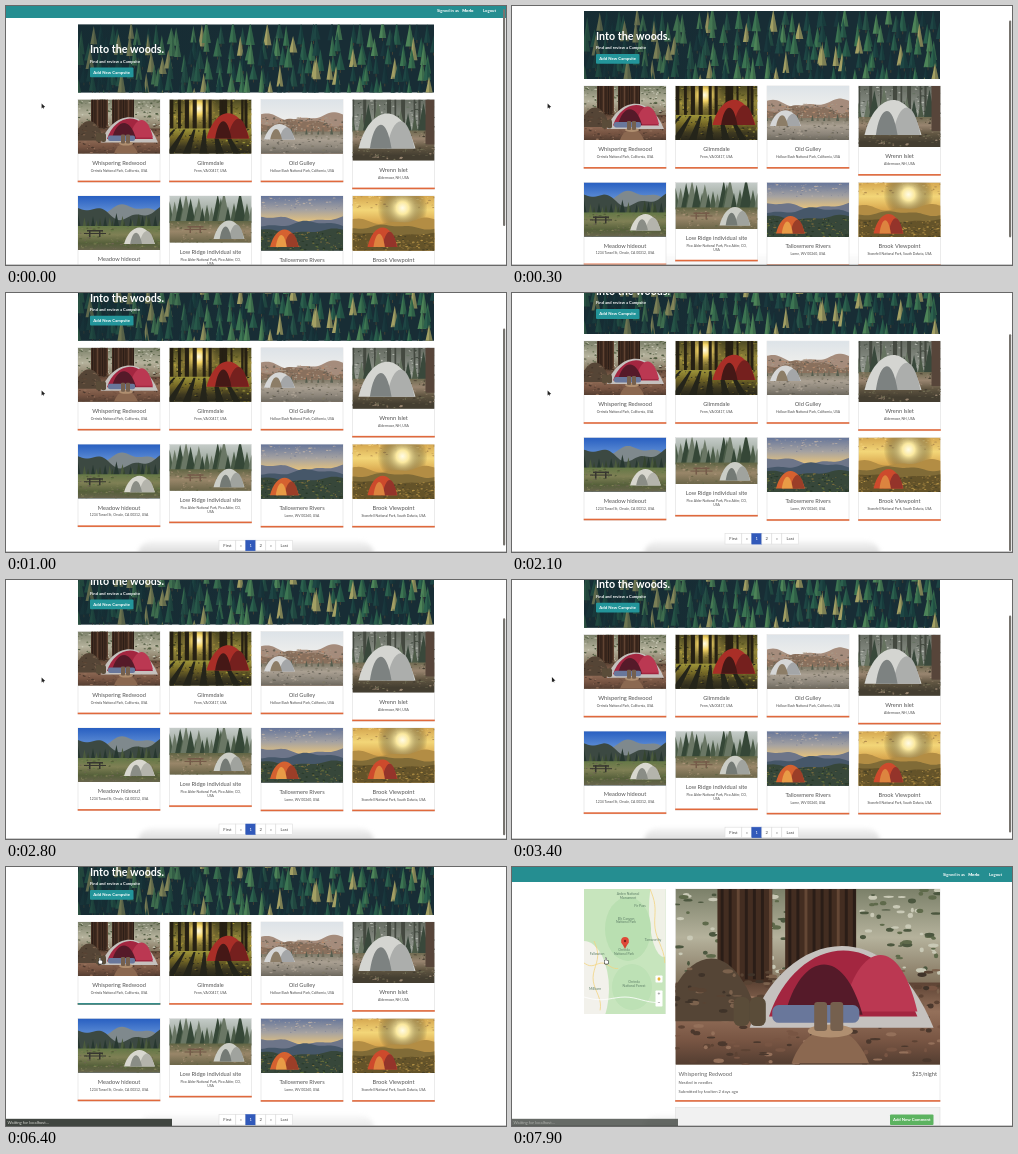
These frames come from a looping animation (500 by 259 pixels, 8 s). An HTML page with a canvas:

```html
<!DOCTYPE html>
<html lang="en">
<head>
<meta charset="utf-8">
<title>Campsites</title>
<style>
html, body { margin: 0; width: 100%; height: 100%; overflow: hidden; background: #fff; }
canvas { display: block; width: 500px; height: 259px; }
</style>
</head>
<body>
<canvas id="stage"></canvas>
<script>
const W = 500, H = 259, LOOP = 8000, STEP = 100;
const FONT = 'Lato, "Open Sans", sans-serif';
const TEAL = '#258e91', ORANGE = '#e0693c';
const canvas = document.getElementById('stage');
const dpr = window.devicePixelRatio || 1;
canvas.width = W * dpr;
canvas.height = H * dpr;
const c = canvas.getContext('2d');

function rect(x, y, w, h, fill) {
  c.fillStyle = fill;
  c.fillRect(x, y, w, h);
}

function poly(fill, ...p) {
  c.fillStyle = fill;
  c.beginPath();
  for (let i = 0; i < p.length; i += 2) c.lineTo(p[i], p[i + 1]);
  c.fill();
}

function oval(x, y, rx, ry, fill) {
  c.fillStyle = fill;
  c.beginPath();
  c.ellipse(x, y, rx, ry, 0, 0, 7);
  c.fill();
}

function pill(x, y, w, h, r, fill) {
  c.fillStyle = fill;
  c.beginPath();
  c.roundRect(x, y, w, h, r);
  c.fill();
}

function outline(x, y, w, h, color) {
  c.strokeStyle = color;
  c.lineWidth = 0.6;
  c.strokeRect(x, y, w, h);
}

function text(s, x, y, size, fill, align = 'left', weight = 400) {
  c.font = `${weight} ${size}px ${FONT}`;
  c.textAlign = align;
  c.textBaseline = 'middle';
  c.fillStyle = fill;
  c.fillText(s, x, y);
}

function clipped(x, y, w, h, paint) {
  c.save();
  c.beginPath();
  c.rect(x, y, w, h);
  c.clip();
  paint();
  c.restore();
}

function fade(y0, y1, ...colors) {
  const g = c.createLinearGradient(0, y0, 0, y1);
  colors.forEach((col, i) => g.addColorStop(i / (colors.length - 1), col));
  return g;
}

function rng(seed) {
  return () => (seed = (seed * 16807) % 2147483647) / 2147483647;
}

// Eased progress from 0 at a to 1 at b
function smooth(t, a, b) {
  const p = Math.min(1, Math.max(0, (t - a) / (b - a)));
  return p * p * (3 - 2 * p);
}

// Scenery, in units where a picture is 82 wide

function glare(x, y, r, color) {
  const g = c.createRadialGradient(x, y, 0, x, y, r);
  g.addColorStop(0, '#fffbe6');
  g.addColorStop(0.25, color);
  g.addColorStop(1, 'transparent');
  rect(0, 0, 82, 61, g);
}

function ridge(y, amp, seed, fill) {
  c.fillStyle = fill;
  c.beginPath();
  c.moveTo(0, 62);
  for (let x = 0; x <= 82; x += 2) {
    c.lineTo(x, y - amp * (Math.sin(x / 13 + seed) * 0.6 + Math.sin(x / 5 + seed * 3) * 0.3));
  }
  c.lineTo(82, 62);
  c.fill();
}

function trunks(seed, n, base, w, color) {
  const r = rng(seed);
  for (let i = 0; i < n; i++) rect((i + r() * 0.8) * 82 / n, 0, w * (0.5 + r()), base + r() * 2, color);
}

function pines(seed, n, base, size, ...colors) {
  const r = rng(seed);
  for (let i = 0; i < n; i++) {
    const x = (i + r()) * 82 / n, h = size * (0.6 + r() * 0.7), w = h * 0.2;
    poly(colors[i % colors.length], x - w, base, x, base - h, x + w, base);
  }
}

function specks(seed, n, y0, y1, ...colors) {
  const r = rng(seed);
  for (let i = 0; i < n; i++) {
    oval(r() * 82, y0 + r() * (y1 - y0), 0.4 + r() * 1.3, 0.2 + r() * 0.6, colors[i % colors.length]);
  }
}

function ground(seed, y, ...colors) {
  rect(0, y, 82, 62 - y, fade(y, 56, ...colors));
  specks(seed, 170, y, 60, ...colors);
}

function dome(x, y, w, h, fill) {
  c.fillStyle = fill;
  c.beginPath();
  c.moveTo(x, y + h);
  c.bezierCurveTo(x + w * 0.16, y - h * 0.08, x + w * 0.72, y - h * 0.5, x + w, y + h);
  c.fill();
}

function tent(x, y, w, h, light, shade, door) {
  dome(x, y, w, h, light);
  dome(x + w * 0.5, y + h * 0.22, w * 0.48, h * 0.78, shade);
  dome(x + w * 0.2, y + h * 0.32, w * 0.38, h * 0.68, door);
}

function table(x, y, color) {
  rect(x + 3, y, 16, 1.5, color);
  rect(x, y + 3, 22, 1, color);
  for (const dx of [5, 15]) rect(x + dx, y, 1.5, 7, color);
}

const scenes = [
  () => {
    rect(0, 0, 82, 55, fade(0, 30, '#7b8069', '#b5b29c', '#80705a'));
    specks(9, 200, 0, 26, '#4c573f', '#c9c9b6', '#5f6a4b');
    ground(5, 29, '#5d4334', '#94705a', '#785543', '#4b382d');
    for (const [x, w] of [[13, 17], [34, 22]]) {
      rect(x, 0, w, 29, '#432d21');
      for (let i = 1; i < w; i += 2.5) rect(x + i, 0, 0.9, 28, i % 2 ? '#2a1d17' : '#644735');
    }
    dome(-4, 21, 30, 20, '#554536');
    specks(13, 90, 24, 38, '#3f3329', '#7c624d', '#584333');
    dome(23, 17, 57, 26, '#c5c1be');
    dome(29, 18.5, 46, 21, '#a32640');
    dome(52, 20, 23, 18, '#bb3852');
    dome(34, 23, 24, 16, '#551a29');
    pill(30, 36, 27, 5.5, 2, '#69779b');
    for (const x of [18, 23]) pill(x, 33.5, 5, 9, 2, '#5a4c39');
    dome(36, 43, 24, 11, '#8b6850');
    oval(48, 44, 7, 2, '#b08f70');
    for (const x of [43, 48]) pill(x, 35, 4, 9, 1, '#75604e');
  },
  () => {
    rect(0, 0, 82, 55, fade(0, 34, '#4b4822', '#94873a', '#695f27'));
    specks(4, 160, 0, 26, '#2b2e15', '#baa33e', '#55521f');
    glare(29, 9, 24, '#f5d566');
    trunks(44, 11, 32, 3, '#262013');
    ground(7, 29, '#9e963a', '#756826', '#3d3820', '#24231a');
    for (let i = 0; i < 6; i++) {
      const x = 4 + i * 10;
      poly('#24241a', x, 30, x + 2, 30, x * 1.7 - 20, 55, x * 1.7 - 28, 55);
    }
    tent(37, 13, 43, 26, '#a92e27', '#75201e', '#451816');
  },
  () => {
    rect(0, 0, 82, 55, fade(0, 22, '#dde3e8', '#eeeeec'));
    ridge(17, 5, 2, '#a58c7c');
    ridge(23, 5, 5, '#89705d');
    specks(15, 180, 18, 33, '#b58c70', '#665e51', '#a89a88');
    ground(12, 32, '#7f7967', '#aaa092', '#8c857a', '#625e54');
    pines(8, 12, 35, 8, '#555d4e', '#726b5a');
    tent(3, 24, 31, 16, '#d5d6d6', '#a4a6a8', '#8c7d67');
  },
  () => {
    rect(0, 0, 82, 61, fade(0, 32, '#666c62', '#9ba098'));
    specks(22, 180, 0, 30, '#3f483d', '#b6b9b0', '#677362');
    trunks(31, 9, 32, 3, '#444940');
    pines(31, 13, 32, 24, '#4c5a47', '#667360', '#39483b');
    ground(21, 31, '#6f6b51', '#998570', '#615642', '#443e31');
    rect(73, 0, 9, 45, '#57453a');
    tent(6, 13, 57, 36, '#d4d5d1', '#acaeac', '#7d8281');
  },
  () => {
    rect(0, 0, 82, 55, fade(0, 25, '#285fc1', '#7ba6df'));
    ridge(14, 7, 4, '#7f898d');
    ridge(17, 9, 1, '#3c4942');
    pines(14, 20, 32, 12, '#273730', '#4b5b3d', '#35452f');
    ground(17, 30, '#647846', '#7f8055', '#555f3a', '#6e6653');
    table(6, 34, '#373630');
    tent(46, 31, 31, 17, '#d8d7cf', '#b4b4ac', '#8a8d86');
  },
  () => {
    rect(0, 0, 82, 47, fade(0, 24, '#c5ccc9', '#8b9789'));
    pines(3, 20, 27, 25, '#4a5b47', '#6a7765', '#354737');
    ground(6, 25, '#606544', '#998669', '#6e684b', '#a89277');
    table(15, 30, '#755b49');
    tent(44, 24, 31, 19, '#cbcdc6', '#a0a39e', '#747a75');
  },
  () => {
    rect(0, 0, 82, 55, fade(0, 28, '#65759a', '#a5a2a1', '#f0c877'));
    specks(16, 70, 1, 14, '#808598', '#b7ada6');
    ridge(23, 4, 1, '#6d7589');
    ridge(28, 4, 4, '#465769');
    ridge(35, 3, 2, '#37473a');
    specks(19, 160, 36, 55, '#5f7038', '#273728', '#796b3d');
    tent(9, 33, 29, 18, '#d56130', '#9b3e28', '#e89b46');
  },
  () => {
    rect(0, 0, 82, 55, fade(0, 28, '#d5a750', '#f3d678', '#d7a44c'));
    specks(28, 70, 0, 13, '#b59050', '#f0cf79');
    glare(50, 12, 25, '#fbe99f');
    ridge(25, 4, 2, '#b38d44');
    ridge(31, 3, 5, '#806b37');
    ridge(38, 2, 1, '#645329');
    specks(23, 170, 38, 55, '#b49245', '#484126', '#846a35');
    tent(15, 31, 30, 20, '#cd4a2c', '#94342a', '#dd843f');
  }
];

function photo(i, x, y, w, h) {
  clipped(x, y, w, h, () => {
    c.translate(x, y);
    c.scale(w / 82, w / 82);
    scenes[i]();
  });
}

// name, picture height, place lines
const cards = [
  ['Whispering Redwood', 54, 'Orrinda National Park, California, USA'],
  ['Glimmdale', 54, 'Fenn, VA 00417, USA'],
  ['Old Gulley', 54, 'Hollow Bush National Park, California, USA'],
  ['Wrenn Islet', 61, 'Aldermoor, NH, USA'],
  ['Meadow hideout', 54, '1234 Tansel St, Orvale, CA 00312, USA'],
  ['Low Ridge individual site', 46.5, 'Pico Alder National Park, Pico Alder, CO,', 'USA'],
  ['Tallowmere Rivers', 54.5, 'Lorne, WV 00260, USA'],
  ['Brook Viewpoint', 54.5, 'Stonefell National Park, South Dakota, USA']
];

function panel(x, y, w, h) {
  rect(x, y, w, h, '#fff');
  outline(x, y, w, h, '#dedede');
  rect(x - 0.3, y + h - 1.6, w + 0.6, 1.6, ORANGE);
}

function card([name, ph, ...place], i, hover) {
  const x = 72 + (i % 4) * 91.5, y = i < 4 ? 93.5 : 190, mid = x + 41;
  const h = ph + 25 + place.length * 3.7;
  panel(x, y, 82, h);
  if (i === 0) {
    c.globalAlpha = hover;
    rect(x - 0.3, y + h - 1.6, 82.6, 1.6, TEAL);
    c.globalAlpha = 1;
  }
  photo(i, x, y, 82, ph);
  text(name, mid, y + ph + 9.5, 5.7, '#555', 'center');
  place.forEach((s, n) => text(s, mid, y + ph + 17 + n * 4, 3.4, '#4a4a4a', 'center'));
}

function header() {
  rect(0, 0, W, 15, TEAL);
  text('Signed in as', 431, 7.5, 4.2, '#fff', 'left', 700);
  text('Merlo', 467.5, 7.5, 4.2, '#fff', 'right', 900);
  text('Logout', 477, 7.5, 4.2, '#fff', 'left', 700);
}

function button(label, x, y, w, h, fill) {
  pill(x, y, w, h, 1, fill);
  text(label, x + w / 2, y + h / 2 + 0.1, 4.3, '#fff', 'center', 700);
}

function forest() {
  const r = rng(77);
  const tones = ['#1e4644', '#2b604d', '#3c7552', '#1a383d', '#4d8458', '#285449', '#a3a064'];
  rect(72, 18, 356, 69, '#182d35');
  for (let row = 0; row < 6; row++) {
    for (let x = 70; x < 432; x += 10) {
      const tx = x + r() * 9, y = 32 + row * 13 + r() * 10, h = 16 + r() * 8, w = 3 + r() * 1.6;
      rect(tx - 0.4, y, 0.8, 3, '#4b4534');
      poly(tones[Math.floor(r() * tones.length)], tx - w, y, tx, y - h, tx + w, y);
      poly('rgba(10,28,36,.25)', tx, y - h, tx + w, y, tx, y);
    }
  }
  const g = c.createLinearGradient(72, 0, 240, 0);
  g.addColorStop(0, 'rgba(20,44,50,.5)');
  g.addColorStop(1, 'rgba(20,44,50,0)');
  rect(72, 18, 356, 69, g);
}

function hero() {
  clipped(72, 18.5, 356, 68, forest);
  text('Into the woods.', 84, 44, 10.7, '#fff', 'left', 700);
  text('Find and review a Campsite', 84, 55.3, 4.1, '#fff', 'left', 700);
  button('Add New Campsite', 84, 61.5, 43.5, 9.8, '#23959a');
}

function pager() {
  let x = 213;
  for (const s of ['First', '«', '1', '2', '»', 'Last']) {
    const on = s === '1', w = s.length > 1 ? 16.8 : 10;
    rect(x, 286, w, 10.5, on ? '#3159ba' : '#fff');
    outline(x, 286, w, 10.5, on ? '#3159ba' : '#dcdcdc');
    text(s, x + w / 2, 291.3, 4.2, on ? '#fff' : '#444', 'center');
    x += w;
  }
}

function glow(alpha) {
  c.save();
  c.globalAlpha = alpha;
  c.filter = 'blur(2px)';
  pill(132, 248, 236, 30, 14, fade(246, 259, '#fafafa', '#dedede'));
  c.restore();
}

function listPage(t) {
  const bounce = smooth(t, 900, 1800) - smooth(t, 2000, 3600);
  const scroll = 38.5 * smooth(t, 0, 750) + 7 * bounce;
  glow(smooth(t, 100, 700) - 0.4 * smooth(t, 3700, 4600));
  c.save();
  c.translate(0, -scroll);
  c.save();
  c.translate(0, -3);
  header();
  c.restore();
  hero();
  cards.forEach((item, i) => card(item, i, smooth(t, 4400, 5000)));
  pager();
  c.restore();
  const top = 3 + scroll * 0.84;
  c.globalAlpha = 1 - smooth(t, 4600, 5000);
  pill(497, top, 2.2, Math.min(217, 260 - top), 1.1, '#77746f');
  c.globalAlpha = 1;
}

function road(x, y, dx, dy, bend, color) {
  c.strokeStyle = color;
  c.lineWidth = 0.8;
  c.beginPath();
  for (let i = 0; i <= 1; i += 0.05) {
    const s = bend * Math.sin(i * 9);
    c.lineTo(x + dx * i + (dy > dx ? s : 0), y + dy * i + (dy > dx ? 0 : s));
  }
  c.stroke();
}

function mapView() {
  rect(72, 22, 82, 125, '#c7e5bd');
  oval(72, 122, 25, 48, '#f2f1eb');
  oval(152, 42, 15, 48, '#f0f1e7');
  oval(116, 62, 23, 32, '#b9dfb1');
  oval(120, 120, 20, 23, '#bde1b5');
  road(72, 96, 36, 4, 2, '#f3d582');
  road(82, 74, 4, 73, 3, '#f3d582');
  road(138, 22, 14, 78, 2, '#f3d582');
  road(72, 130, 82, 4, 2, '#fff');
  const labels = [
    ['Arden National|Monument', 116, 27], ['Fir Pass', 128, 38.5], ['Elk Canyon|National Park', 114, 51.5],
    ['Tamworthy', 141, 73], ['Orrinda|National Park', 112, 83], ['Fallowton', 85, 87],
    ['Orrinda|National Forest', 122, 115], ['Millbarn', 83, 122]
  ];
  for (const [s, x, y] of labels) {
    s.split('|').forEach((part, i) => text(part, x, y + i * 3.7, 3.4, '#5f7f68', 'center'));
  }
  pill(143.5, 108.5, 7, 7, 0.7, '#fff');
  oval(147, 112, 1.5, 1.8, '#e8b33b');
  pill(143.5, 123.5, 7, 16, 0.7, '#fff');
  text('+', 147, 127.3, 5, '#666', 'center');
  text('−', 147, 135.3, 5, '#666', 'center');
  poly('#d4452f', 109.4, 75, 116.6, 75, 113, 82);
  oval(113, 74, 3.9, 3.9, '#df4a38');
  oval(113, 74, 1.2, 1.2, '#7c1f19');
}

function detailPage(t) {
  glow(0.6);
  header();
  rect(72, 22, 81.5, 125, '#e5e3df');
  if (t >= 7100) clipped(72, 22, 81.5, 125, mapView);
  panel(163.5, 22, 264.5, 212.7);
  photo(0, 163.5, 22, 264.5, 175.5);
  text('Whispering Redwood', 166.5, 207.3, 5.7, '#666');
  text('$25/night', 425, 207.3, 5.7, '#555', 'right');
  text('Nestled in needles', 166.5, 215.8, 4.2, '#555');
  text('Submitted by kvolten 2 days ago', 166.5, 225, 4.2, '#555');
  rect(163.5, 240.5, 264.5, 19, '#f1f1f1');
  outline(163.5, 240.5, 264.5, 30, '#dedede');
  button('Add New Comment', 378, 247.5, 43.5, 10.5, '#5cb360');
}

function status(t) {
  const shown = smooth(t, 4300, 4900) - 0.4 * smooth(t, 7800, 8000);
  const s = t < 5900 ? 'localhost:3000/campgrounds/5c9e41b7d20a6f38c4e1902b' : 'Waiting for localhost...';
  c.globalAlpha = shown;
  rect(0, 251.8, 166, 8, '#404540');
  c.globalAlpha = shown * shown;
  text(s, 1.5, 255.6, 4.2, '#d9dad4');
  c.globalAlpha = 1;
}

function cursor(t) {
  const p = smooth(t, 3200, 4400);
  c.save();
  c.translate(36 + 58 * p, 98 - 6 * p);
  if (p < 0.65) {
    poly('#222', -0.4, -0.6, -0.4, 4.6, 0.8, 3.6, 2, 5.2, 1.7, 3.2, 3.2, 3.1);
  } else {
    pill(-2, 1, 4.8, 4.4, 1.4, '#333');
    pill(-1, -1.4, 1.8, 5, 0.9, '#333');
    pill(-1.4, 1.6, 3.6, 3.2, 1, '#fff');
    pill(-0.6, -1, 1, 4, 0.5, '#fff');
  }
  c.restore();
}

let last = -1;

function draw(now) {
  requestAnimationFrame(draw);
  const t = Math.floor((now % LOOP) / STEP) * STEP;
  if (t === last) return;
  last = t;
  c.setTransform(dpr, 0, 0, dpr, 0, 0);
  rect(0, 0, W, H, '#fff');
  (t < 6700 ? listPage : detailPage)(t);
  rect(0, 258.4, W, 0.6, '#a9a9a9');
  status(t);
  cursor(t);
}

requestAnimationFrame(draw);
</script>
</body>
</html>
```
